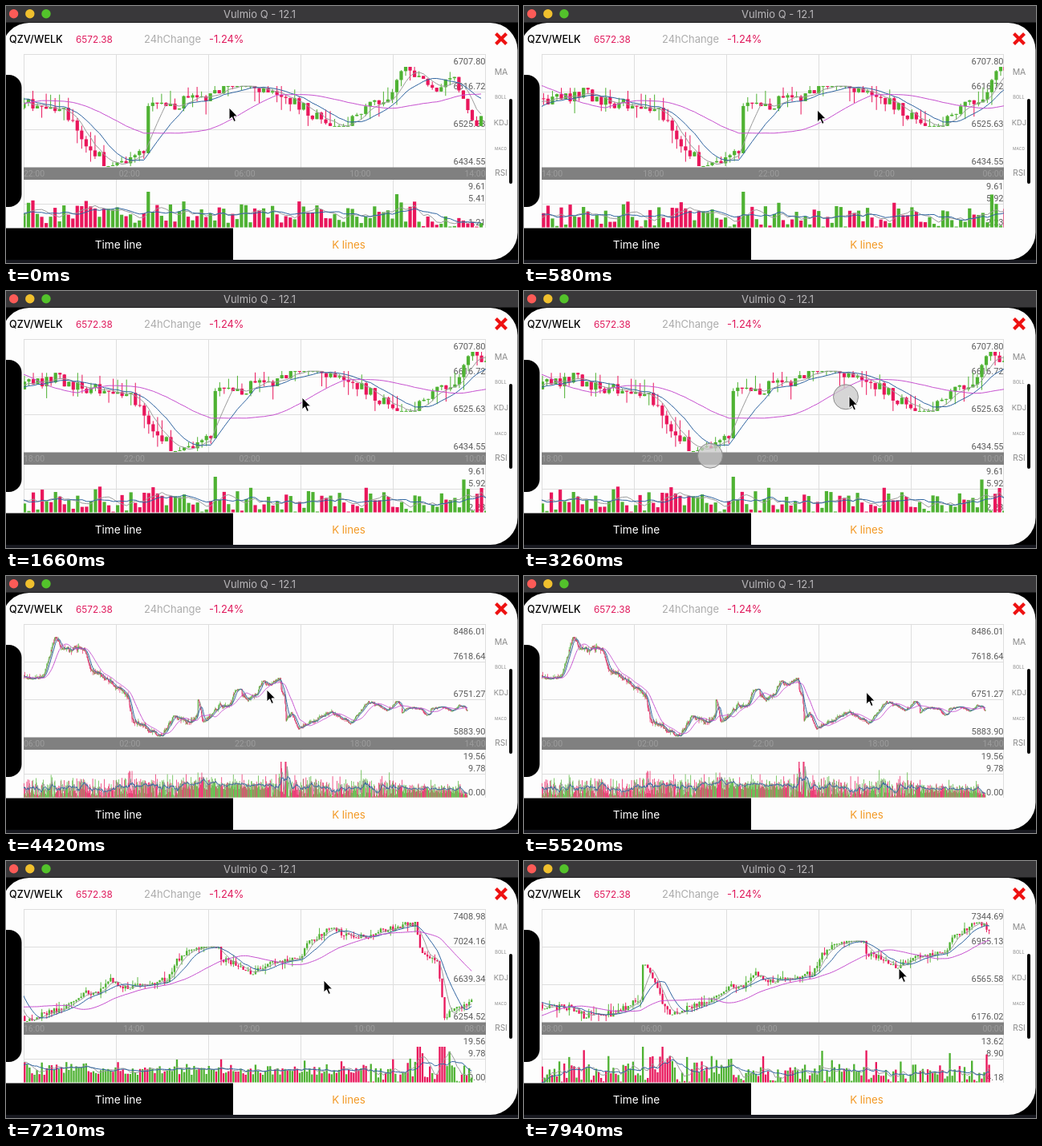
Animation, 638 px wide and 321 px high, one loop 8 s. Source, as an HTML page with a canvas:

```html
<!DOCTYPE html>
<html lang="en">
<head>
<meta charset="utf-8">
<title>Candlestick chart</title>
<style>
  html, body { margin: 0; width: 638px; height: 321px; overflow: hidden; background: #000; }
  svg, canvas { position: absolute; left: 0; top: 0; width: 638px; height: 321px; }
  text { font-family: Inter, "Open Sans", sans-serif; }
  .axis text { font: 11px Roboto, Inter, sans-serif; fill: #5c5c5c; text-anchor: end; }
  .time text { font: 10.5px Roboto, Inter, sans-serif; fill: #9c9c9c; text-anchor: middle; }
  .menu text { fill: #8a8a8a; text-anchor: middle; }
</style>
</head>
<body>
<svg viewBox="0 0 638 321">
  <rect width="638" height="321" fill="#000"/>
  <rect y="317" width="638" height="4" fill="#17181f"/>
  <rect x="-5" y="21" width="642.5" height="296" rx="34" fill="#fdfdfd"/>
  <rect width="638" height="20.5" fill="#39383a"/>
  <g id="lights"></g>
  <text x="316" y="15" font-size="13" fill="#b9b7ba" text-anchor="middle">Vulmio Q - 12.1</text>
  <rect x="-30" y="86" width="49.5" height="165" rx="16" fill="#000"/>
  <text x="4" y="46" font-size="12.6" font-weight="500" fill="#000">QZV/WELK</text>
  <text x="87" y="45.5" font-size="11.8" fill="#e0195c">6572.38</text>
  <text x="172" y="46" font-size="12.9" fill="#acacac">24hChange</text>
  <text x="253" y="46" font-size="12.9" fill="#e0195c">-1.24%</text>
  <path d="M610.5 34.5l13 13m0-13l-13 13" stroke="#e11" stroke-width="4.2"/>
  <g class="menu">
    <text x="617" y="85.5" font-size="10.5">MA</text>
    <text x="616.5" y="116" font-size="5.6">BOLL</text>
    <text x="617" y="149" font-size="9.3">KDJ</text>
    <text x="616.5" y="180" font-size="5">MACD</text>
    <text x="617" y="211.5" font-size="10">RSI</text>
  </g>
  <rect x="627" y="116" width="4" height="106" rx="2" fill="#000"/>
  <rect y="277.5" width="283" height="39.5" fill="#000"/>
  <text x="140" y="302.5" font-size="13.7" fill="#fff" text-anchor="middle">Time line</text>
  <text x="427" y="302.5" font-size="13.3" fill="#f39a26" text-anchor="middle">K lines</text>
  <path id="grid" stroke="#dedede"/>
  <rect x="22" y="201.5" width="576" height="15.5" fill="#808080"/>
  <g class="axis" id="axis"></g>
  <g class="time" id="time"></g>
</svg>
<canvas id="chart"></canvas>
<svg viewBox="0 0 638 321">
  <g id="touch" fill="#c8c8c8" fill-opacity=".75" stroke="#8c8c8c">
    <circle r="15.5"/><circle r="15.5"/>
  </g>
  <path id="cursor" d="M0 0V15L3.5 11.8 6 17.5 8.4 16.4 6 10.9H10.6Z" stroke="#fff"/>
</svg>
<script>
const LOOP = 8000, LEFT = 22, RIGHT = 598, MID = 310, FIRST = -980, LAST_PRICE = 6572.38;
const UP = '#4fb233', DOWN = '#e9175c', GRAY = '#9b9b9b', BLUE = '#2f64a0', PURPLE = '#c651cf';

// turning points [bar, price]; bar 0 is the newest, one bar is two hours
const turns = [
  [FIRST, 7380], [-875, 7440], [-849, 8486.01], [-836, 8150], [-790, 8200], [-778, 7668], [-700, 6950],
  [-690, 6300], [-629, 5883.9], [-606, 6420], [-569, 6230.56], [-557, 6420], [-556, 6840],
  [-545, 6254.52], [-509, 6700], [-502, 6630.89], [-487, 6710], [-484, 6900], [-478, 7080],
  [-466, 7120], [-465, 6970], [-452, 6800], [-445, 6940], [-432, 7010], [-430, 7160],
  [-419, 7339.98], [-409, 7220], [-386, 7408.98], [-383, 7046], [-377, 6950], [-374, 6290],
  [-363, 6500], [-348, 6060], [-281, 6520], [-240, 6230], [-204, 6800], [-165, 6560],
  [-143, 6802.48], [-136, 6660], [-135, 6490], [-127, 6600], [-111, 6650], [-92, 6560],
  [-85, 6434.55], [-76, 6470], [-75, 6600], [-52, 6655], [-34, 6545], [-22, 6610],
  [-17, 6707.8], [-10, 6640], [-6, 6680], [-1, 6545], [0, LAST_PRICE]
];
// trading volume [first bar, least, greatest]
const flows = [
  [FIRST, 0, 16], [-597, 4.18, 13.62], [-504, 4.18, 12.65], [-405, 0, 19.56],
  [-362, 0, 15], [-145, 2.23, 9.61], [-13, 0.95, 5]
];
// drags and pinches [start ms, end ms, bar width, bar at the middle]
const views = [
  [0, 0, 5.53, -51], [240, 1010, 5.53, -92.85], [1060, 1660, 5.53, -66.1],
  [3550, 3960, 0.604, -438.7], [6100, 6270, 5.75, -453.5], [6270, 6440, 3.06, -465],
  [6620, 7210, 3.06, -451.3], [7490, 7940, 3.06, -503.1]
];
// cursor moves [start ms, end ms, x, y]
const pointer = [
  [0, 0, 278, 127], [59, 60, 274, 127], [240, 1010, 495, 134], [1060, 1660, 369, 133],
  [2740, 3440, 412, 131], [3550, 3960, 352, 160], [4130, 4420, 325, 142], [4420, 4890, 445, 145],
  [4950, 5300, 487, 150], [5300, 5750, 363, 140], [5800, 5920, 410, 139], [6100, 6270, 435, 153],
  [6620, 7210, 396, 149], [7210, 7380, 310, 140], [7490, 7940, 467, 134]
];

const $ = id => document.getElementById(id);
const lerp = (a, b, k) => a + (b - a) * k;
const clamp = (v, lo, hi) => Math.min(hi, Math.max(lo, v));
const rnd = (i, k) => { const s = Math.sin(i * 12.9898 + k * 78.233) * 43758.5453; return s - Math.floor(s); };
const indexAt = (list, v) => list.findLastIndex(row => row[0] <= v);

// slow seeded wave between -1 and 1
function drift(i, span) {
  const n = Math.floor(i / span);
  return 2 * lerp(rnd(n, 5), rnd(n + 1, 5), i / span - n) - 1;
}

function makeBars() {
  const bars = [];
  let last = turns[0][1];
  for (let i = FIRST; i <= 0; i++) {
    const n = Math.min(indexAt(turns, i), turns.length - 2), a = turns[n], b = turns[n + 1];
    const near = turns.slice(Math.max(0, n - 1), n + 3).map(p => p[1]);
    const fit = v => clamp(v, Math.min(...near), Math.max(...near));
    const noise = 14 + 28 * Math.min(1, -i / 700);
    const atTurn = i === a[0] || i === b[0];
    const wobble = atTurn ? 0 : noise * (1.3 * drift(i, 5) + 2 * rnd(i, 1) - 1);
    const open = last, close = fit(lerp(a[1], b[1], (i - a[0]) / (b[0] - a[0])) + wobble);
    const wick = k => noise * 2.4 * rnd(i, k) ** 3;
    const [, least, most] = flows[indexAt(flows, i)];
    const rush = (Math.abs(close - open) / noise / 4) ** 2;
    bars.push({
      open, close,
      high: fit(Math.max(open, close) + wick(2)),
      low: fit(Math.min(open, close) - wick(3)),
      vol: lerp(least, most, clamp(0.65 * rnd(i, 4) ** 1.2 - 0.02 + rush, 0, 1))
    });
    last = close;
  }
  return bars;
}

function average(list, key, span) {
  let sum = 0;
  return list.map((b, n) => {
    sum += b[key] - (n >= span ? list[n - span][key] : 0);
    return sum / Math.min(span, n + 1);
  });
}

const bars = makeBars();
const priceLines = [[5, GRAY], [10, BLUE], [30, PURPLE]].map(([n, c]) => [average(bars, 'close', n), c]);
const volLines = [[5, GRAY], [10, BLUE]].map(([n, c]) => [average(bars, 'vol', n), c]);

function add(parent, tag, attrs) {
  const el = document.createElementNS('http://www.w3.org/2000/svg', tag);
  for (const name in attrs) el.setAttribute(name, attrs[name]);
  return parent.appendChild(el);
}
['#fc5b57', '#f0c02e', '#53c22b'].forEach((fill, n) =>
  add($('lights'), 'circle', { cx: 9.6 + 20.2 * n, cy: 9.8, r: 5.7, fill }));
$('grid').setAttribute('d',
  [60.5, 107.5, 154.5, 247.5].map(y => `M${LEFT} ${y}H${RIGHT}`).join('') +
  [0, 1, 2, 3, 4, 5].map(n => `M${22.5 + 115 * n} 60V277`).join(''));
const axisTexts = [73, 104, 151, 198, 229, 244, 274].map(y => add($('axis'), 'text', { x: 597.5, y }));
const timeTexts = [4, 3, 2, 1, 0].map(() => add($('time'), 'text', { y: 213 }));

const canvas = $('chart'), ctx = canvas.getContext('2d');
const dpr = window.devicePixelRatio || 1;
canvas.width = 638 * dpr;
canvas.height = 321 * dpr;
ctx.scale(dpr, dpr);

function moveAt(list, t) {
  const n = indexAt(list, t), b = list[n], a = list[Math.max(0, n - 1)];
  const k = clamp((t - b[0]) / (b[1] - b[0] || 1), 0, 1);
  return [a, b, k * k * (3 - 2 * k)];
}

function viewAt(t) {
  const [a, b, k] = moveAt(views, t);
  const w = a[2] * (b[2] / a[2]) ** k;
  // while zooming, keep the pinched point in place
  const j = a[2] === b[2] ? k : (1 / w - 1 / a[2]) / (1 / b[2] - 1 / a[2]);
  return { w, mid: lerp(a[3], b[3], j) };
}

function clipped(top, height, draw) {
  ctx.save();
  ctx.beginPath();
  ctx.rect(LEFT, top, RIGHT - LEFT, height);
  ctx.clip();
  draw();
  ctx.restore();
}

function drawChart(t) {
  const { w, mid } = viewAt(t);
  const edge = t < 3550 ? 597 : 579.5;
  const from = Math.max(FIRST, Math.ceil(mid + (LEFT - MID) / w));
  const to = Math.min(0, Math.ceil(mid + (edge - MID) / w));
  const shown = bars.slice(from - FIRST, to - FIRST + 1);
  const hi = Math.max(...shown.map(b => b.high)), lo = Math.min(...shown.map(b => b.low));
  const vHi = Math.max(...shown.map(b => b.vol)), vLo = Math.min(...shown.map(b => b.vol));
  const x = i => MID + (i - mid) * w;
  const y = p => 200 - (p - lo) / (hi - lo) * 124;
  const yVol = v => 276.5 - (v - vLo) / (vHi - vLo) * 44.5;
  const body = Math.max(0.7, w * 0.76), stem = clamp(w * 0.3, 0.6, 1);

  const column = (i, width, top, base) => ctx.fillRect(x(i) - width / 2, top, width, base - top);
  const eachBar = draw => shown.forEach((b, n) => {
    ctx.fillStyle = b.close >= b.open ? UP : DOWN;
    draw(b, from + n);
  });
  const drawLines = (lines, toY) => lines.forEach(([values, color]) => {
    ctx.beginPath();
    for (let i = Math.max(FIRST, from - 1); i <= to; i++) ctx.lineTo(x(i), toY(values[i - FIRST]));
    ctx.strokeStyle = color;
    ctx.stroke();
  });

  ctx.clearRect(0, 0, 638, 321);
  clipped(60, 141.5, () => {
    eachBar((b, i) => {
      const top = y(Math.max(b.open, b.close)), base = y(Math.min(b.open, b.close));
      column(i, stem, y(b.high), y(b.low));
      column(i, body, top, Math.max(top + 1, base));
    });
    drawLines(priceLines, y);
  });
  clipped(217, 60, () => {
    eachBar((b, i) => column(i, body, Math.min(275.5, yVol(b.vol)), 276.5));
    drawLines(volLines, yVol);
  });

  [hi, lerp(hi, lo, 1 / 3), lerp(hi, lo, 2 / 3), lo, vHi, (vHi + vLo) / 2, vLo]
    .forEach((v, n) => { axisTexts[n].textContent = v.toFixed(2); });

  const perColumn = Math.round(143.75 / w), start = x(to) - edge + 15;
  timeTexts.forEach((el, n) => {
    const hour = ((14 + 2 * (to - (4 - n) * perColumn)) % 24 + 24) % 24;
    el.textContent = String(hour).padStart(2, '0') + ':00';
    el.setAttribute('x', clamp(start + n * 143.75, 35, 584.5));
  });
}

function drawPointer(t) {
  const [a, b, k] = moveAt(pointer, t);
  const x = lerp(a[2], b[2], k), y = lerp(a[3], b[3], k);
  const place = (el, px, py) => el.setAttribute('transform', `translate(${px} ${py})`);
  const pinch = (t >= 2800 && t < 4130) || (t >= 5700 && t < 6620);
  const [finger, mirror] = $('touch').children;
  $('touch').style.display = pinch ? '' : 'none';
  place($('cursor'), x, y);
  place(finger, x - 4, y + 1);
  place(mirror, 637 - x, 337 - y);
}

function tick() {
  const t = performance.now() % LOOP;
  drawChart(t);
  drawPointer(t);
  requestAnimationFrame(tick);
}
tick();
</script>
</body>
</html>
```
